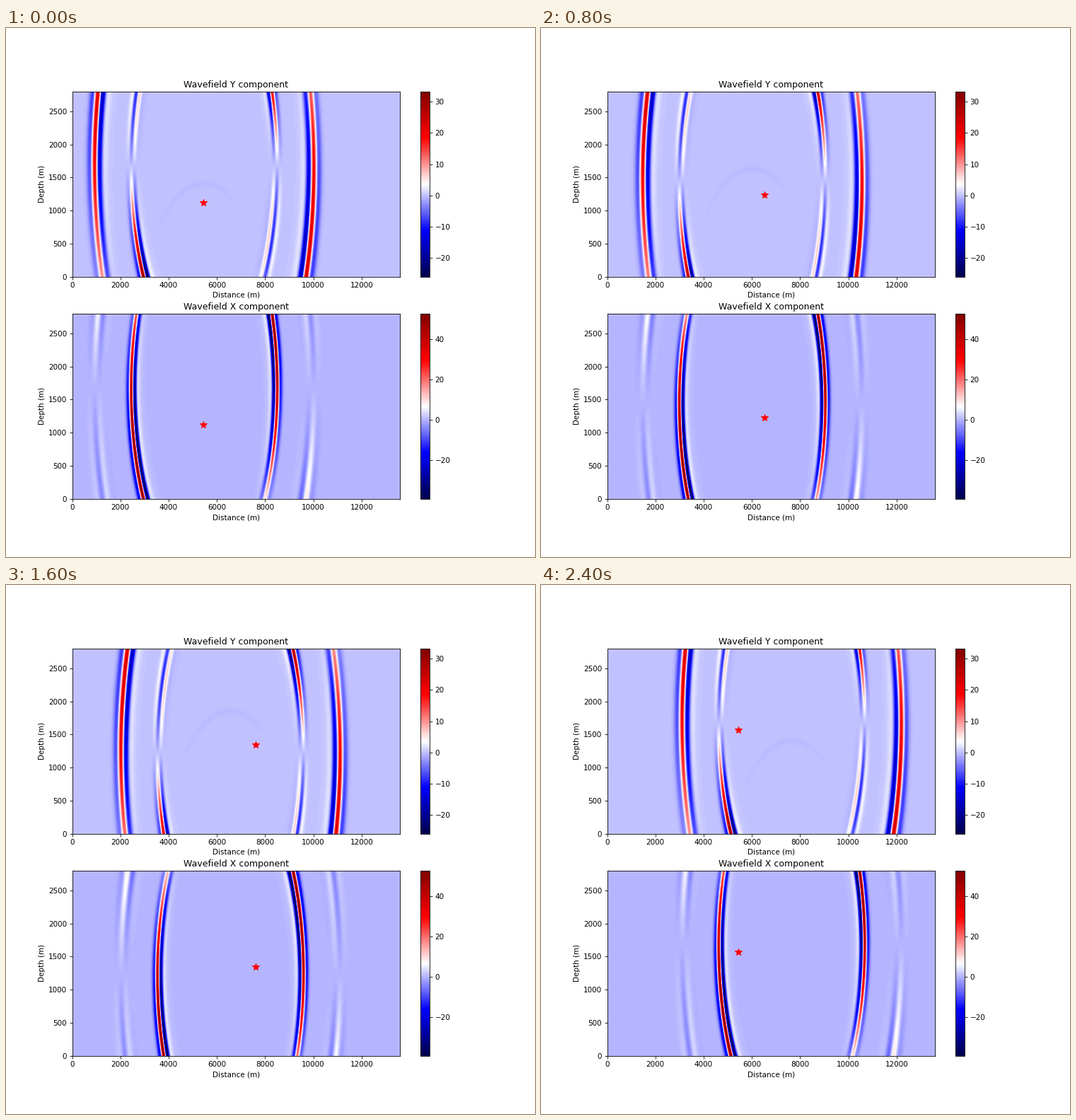
Write a matplotlib script that moves like this. It is 748 by 748 pixels and loops after 2.5 s.

```python
import numpy as np
import matplotlib.pyplot as plt
from matplotlib.animation import FuncAnimation

STAGE, INCHES = 748, 10
FRAMES, INTERVAL = 25, 100
WIDTH, DEPTH = 13600, 2800      # model size in metres
W, H = 464, 262                 # grid size, about one cell per pixel
CELLS = 25                      # source positions per axis
FIRST, ROW = 10, 6              # first source cell, shots per depth
STRETCH = (H / DEPTH) / (W / WIDTH)

# front radius, pulse length, amplitude
P_WAVE = (155.0, 6.3, 19.5)
S_WAVE = (103.2, 4.2, 43.5)
ECHO_RADIUS = 105.5

X, Y = np.meshgrid(np.arange(W) + 0.5, np.arange(H) + 0.5)


def make_pulse(order=2.5, n=4096, dt=0.02):
    """Fractional derivative of a Gaussian, main peak at time zero."""
    f = np.fft.rfftfreq(n, dt)
    spectrum = -(2j * np.pi * f) ** order * np.exp(-(np.pi * f) ** 2)
    w = np.fft.fftshift(np.fft.irfft(spectrum, n))
    t = (np.arange(n) - w.argmax()) * dt
    return t, w / w.max()


PULSE_T, PULSE = make_pulse()


def front(rho, wave):
    radius, length, amp = wave
    return amp * np.interp((radius - rho) / length, PULSE_T, PULSE)


def echo(dx, cy):
    """Faint reflection of the slow front from the lower edge."""
    dy = (Y - (2 * H - cy)) / STRETCH
    rho = np.hypot(dx, dy)
    fade = np.exp(-((dx / ECHO_RADIUS + 0.1) / 0.5) ** 6) * (dy < 0)
    return -0.35 * fade * np.exp(-((rho - ECHO_RADIUS) / 1.8) ** 2)


def wavefield(i, j):
    """Both components for a diagonal point force."""
    dx = X - (W * j / CELLS + 0.7)
    cy = H * i / CELLS
    dy = (Y - cy) / STRETCH
    rho = np.hypot(dx, dy)
    c, s = dx / rho, dy / rho
    p = (c + s) * front(rho, P_WAVE)
    q = (c - s) * front(rho, S_WAVE)
    return p * c - q * s + echo(dx, cy), p * s + q * c


def source(n):
    row, col = divmod(n, ROW)
    return FIRST + col, FIRST + row


def panel(ax, name, vmin, vmax):
    im = ax.imshow(np.zeros((H, W)), cmap="seismic", vmin=vmin, vmax=vmax,
                   extent=(0, WIDTH, 0, DEPTH), aspect="auto")
    star, = ax.plot([], [], "r*", markersize=10)
    ax.set(title=f"Wavefield {name} component",
           xlabel="Distance (m)", ylabel="Depth (m)")
    fig.colorbar(im, ax=ax)
    return im, star


fig, axes = plt.subplots(2, 1, figsize=(INCHES, INCHES), dpi=STAGE / INCHES)
panels = [panel(axes[0], "Y", -26.03, 33.3),
          panel(axes[1], "X", -39.3, 52.6)]


def update(n):
    i, j = source(n)
    for (im, star), field in zip(panels, wavefield(i, j)):
        im.set_data(field)
        star.set_data([i * WIDTH / CELLS], [j * DEPTH / CELLS])
    return [artist for pair in panels for artist in pair]


anim = FuncAnimation(fig, update, frames=FRAMES, interval=INTERVAL,
                     init_func=lambda: update(0), repeat=True, repeat_delay=0)
plt.show()
```
